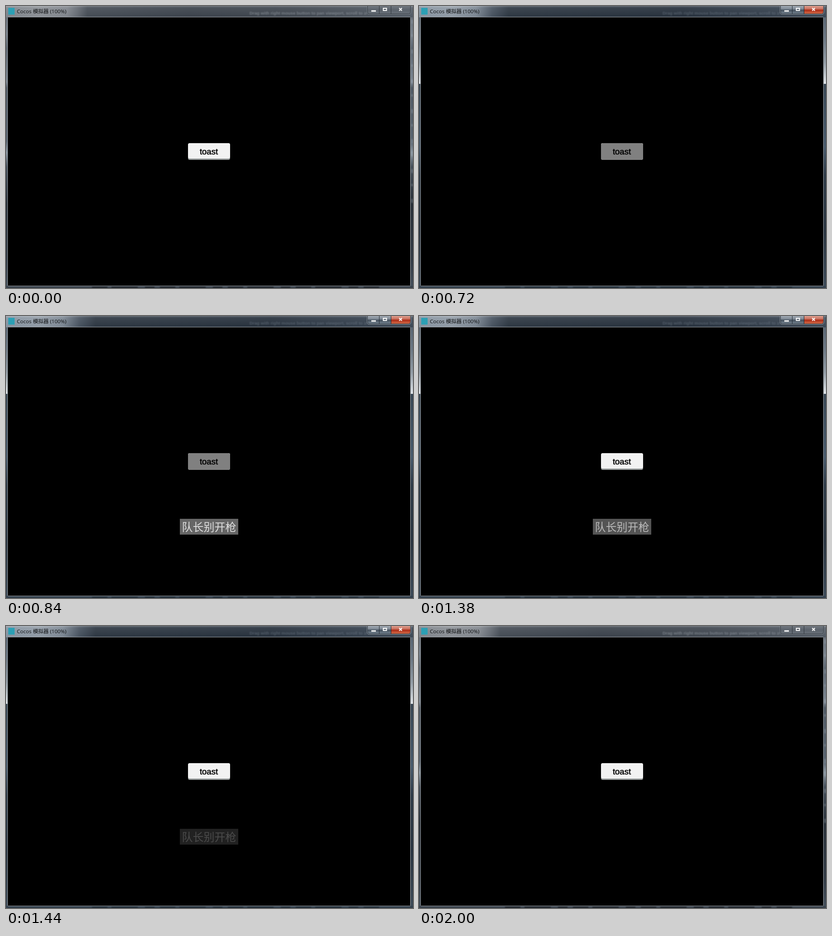
An HTML page that plays this animation: 899x623 px, repeating every 2060 ms.

```html
<!DOCTYPE html>
<html lang="zh">
<head>
<meta charset="utf-8">
<title>Toast</title>
<style>
html, body { margin: 0; width: 100%; height: 100%; overflow: hidden; background: #000; }
svg { display: block; width: 899px; height: 623px; }
.caption { font: 11.6px "Open Sans", "Noto Sans CJK SC", "Noto Sans CJK", sans-serif; fill: #101214; }
.ghost { font: bold 9.6px "Liberation Sans", sans-serif; filter: blur(1.1px); }
.label { font: 18.5px "Liberation Sans", sans-serif; fill: #000; stroke: #000; stroke-width: .55; text-anchor: middle; }
.message { font: 300 24px "Noto Sans CJK SC", "Noto Sans CJK", sans-serif; fill: #e0e0e0; }
.active, .pressed, .toast { opacity: 0; animation: 2060ms step-end infinite; }
.active { animation-name: focus; }
.pressed { animation-name: press; }
.toast { animation-name: toast; }
@keyframes focus {
  0% { opacity: 0; }
  34.95% { opacity: 1; }
  97.08%, 100% { opacity: 0; }
}
@keyframes press {
  0% { opacity: 0; }
  18.44% { opacity: 1; }
  57.28%, 100% { opacity: 0; }
}
@keyframes toast {
  0% { opacity: 0; }
  38.83% { opacity: .5; }
  40.77% { opacity: 1; }
  66.99% { opacity: .8333; animation-timing-function: steps(5, end); }
  71.84%, 100% { opacity: 0; }
}
</style>
</head>
<body>
<svg viewBox="0 0 899 623" xmlns="http://www.w3.org/2000/svg">
  <defs>
    <linearGradient id="barIdle">
      <stop offset="0" stop-color="#7d838a"/>
      <stop offset=".08" stop-color="#8c9096"/>
      <stop offset=".15" stop-color="#80858c"/>
      <stop offset=".175" stop-color="#656b73"/>
      <stop offset=".2" stop-color="#454c55"/>
      <stop offset=".45" stop-color="#3b424b"/>
      <stop offset=".7" stop-color="#3f464f"/>
      <stop offset="1" stop-color="#535b65"/>
    </linearGradient>
    <linearGradient id="barActive">
      <stop offset="0" stop-color="#85929f"/>
      <stop offset=".08" stop-color="#919ba6"/>
      <stop offset=".14" stop-color="#7b8692"/>
      <stop offset=".18" stop-color="#47525f"/>
      <stop offset=".22" stop-color="#2d3742"/>
      <stop offset=".65" stop-color="#26303c"/>
      <stop offset="1" stop-color="#3c4856"/>
    </linearGradient>
    <linearGradient id="gloss" x2="0" y2="1">
      <stop offset="0" stop-color="#fff" stop-opacity=".3"/>
      <stop offset=".15" stop-color="#fff" stop-opacity=".08"/>
      <stop offset="1" stop-color="#fff" stop-opacity="0"/>
    </linearGradient>
    <linearGradient id="sideIdle" x2="0" y2="1">
      <stop offset="0" stop-color="#5a626c"/>
      <stop offset=".1" stop-color="#77808a"/>
      <stop offset=".15" stop-color="#59636e"/>
      <stop offset=".27" stop-color="#7b8590"/>
      <stop offset=".29" stop-color="#4d5762"/>
      <stop offset=".48" stop-color="#56616d"/>
      <stop offset=".52" stop-color="#8a959f"/>
      <stop offset=".57" stop-color="#434d58"/>
      <stop offset=".7" stop-color="#252d36"/>
      <stop offset=".9" stop-color="#303944"/>
      <stop offset="1" stop-color="#424d59"/>
    </linearGradient>
    <linearGradient id="sideActive" x2="0" y2="1">
      <stop offset="0" stop-color="#4c5967"/>
      <stop offset=".12" stop-color="#6a7682"/>
      <stop offset=".2" stop-color="#909aa3"/>
      <stop offset=".276" stop-color="#dde2e6"/>
      <stop offset=".276" stop-color="#354452"/>
      <stop offset=".5" stop-color="#46586a"/>
      <stop offset=".6" stop-color="#2b3845"/>
      <stop offset=".8" stop-color="#27323e"/>
      <stop offset="1" stop-color="#3a4856"/>
    </linearGradient>
    <linearGradient id="keyIdle" x2="0" y2="1">
      <stop offset="0" stop-color="#747a82"/>
      <stop offset=".5" stop-color="#5c636c"/>
      <stop offset="1" stop-color="#676f78"/>
    </linearGradient>
    <linearGradient id="keyActive" x2="0" y2="1">
      <stop offset="0" stop-color="#a7afb8"/>
      <stop offset=".48" stop-color="#77828e"/>
      <stop offset=".5" stop-color="#45515e"/>
      <stop offset="1" stop-color="#74828f"/>
    </linearGradient>
    <linearGradient id="closeActive" x2="0" y2="1">
      <stop offset="0" stop-color="#dda091"/>
      <stop offset=".48" stop-color="#c4624f"/>
      <stop offset=".5" stop-color="#ad2b16"/>
      <stop offset="1" stop-color="#d26a48"/>
    </linearGradient>
    <path id="keys" d="M798.5-1V13.5Q798.5 17.5 802.5 17.5H889.5Q893.5 17.5 893.5 13.5V-1M824.5 0V17M850.5 0V17"/>
    <path id="closeKey" d="M851 0H893V13Q893 17 889 17H851Z"/>
    <g id="glyphs">
      <rect x="807" y="9.5" width="10" height="3"/>
      <path d="M833.5 5H840.5V10H833.5Z" fill="none" stroke="#fff" stroke-width="2"/>
      <path d="M868.5 4.5L874.5 10.5M874.5 4.5L868.5 10.5" stroke="#fff" stroke-width="2.2"/>
    </g>
    <clipPath id="barClip"><rect width="797" height="24"/></clipPath>
  </defs>

  <g class="idle">
    <rect width="899" height="623" fill="url(#sideIdle)"/>
    <rect width="899" height="25" fill="url(#barIdle)"/>
    <rect width="899" height="25" fill="url(#gloss)"/>
    <rect y="619" width="899" height="4" fill="#39424c"/>
    <path d="M190 621H830" stroke="#181d23" stroke-width="3" stroke-dasharray="34 9 58 16 21 12" style="filter:blur(1px)"/>
    <path d="M897 30V440" stroke="#a0aab3" stroke-width="3" stroke-dasharray="9 24 5 28" opacity=".45" style="filter:blur(1.5px)"/>
    <g clip-path="url(#barClip)"><text class="ghost" x="538" y="19" fill="#9299a1" opacity=".65">Drag with right mouse button to pan viewport, scroll to zoom</text></g>
    <use href="#keys" fill="url(#keyIdle)" stroke="#2f353c"/>
    <path d="M797.5 0V14Q798 18.5 802.5 18.5H889.5Q894 18.5 894.5 14V0" fill="none" stroke="#9299a0" stroke-opacity=".6"/>
    <use href="#glyphs" fill="#fff"/>
  </g>

  <g class="active">
    <rect width="899" height="623" fill="url(#sideActive)"/>
    <rect width="899" height="25" fill="url(#barActive)"/>
    <rect width="899" height="25" fill="url(#gloss)"/>
    <rect y="619" width="899" height="4" fill="#33404d"/>
    <path d="M190 621H830" stroke="#1e2833" stroke-width="3" stroke-dasharray="34 9 58 16 21 12" style="filter:blur(1px)"/>
    <g clip-path="url(#barClip)"><text class="ghost" x="538" y="19" fill="#7b8794" opacity=".45">Drag with right mouse button to pan viewport, scroll to zoom</text></g>
    <use href="#keys" fill="url(#keyActive)"/>
    <use href="#closeKey" fill="url(#closeActive)"/>
    <use href="#keys" fill="none" stroke="#222a33"/>
    <path d="M797.5 0V14Q798 18.5 802.5 18.5H889.5Q894 18.5 894.5 14V0" fill="none" stroke="#b0b9c1" stroke-opacity=".7"/>
    <use href="#glyphs" fill="#fff"/>
  </g>

  <rect x="5" y="4" width="14" height="15" fill="#2c9fb4"/>
  <text class="caption" x="24" y="16">Cocos 模拟器 (100%)</text>
  <rect x="3.5" y="24.5" width="890" height="594" rx="1" fill="#000" stroke="#a3a9af"/>

  <rect x="402" y="303" width="93" height="37" rx="4" fill="#979b9b"/>
  <rect x="402" y="303" width="93" height="34" rx="4" fill="#f2f2f2"/>
  <rect class="pressed" x="402" y="303" width="93" height="37" rx="4" fill="#808080"/>
  <text class="label" x="448" y="328">toast</text>

  <g class="toast">
    <rect x="384" y="448" width="129" height="35" fill="#666"/>
    <text class="message" x="388.5" y="475">队长别开枪</text>
  </g>
</svg>
</body>
</html>
```
